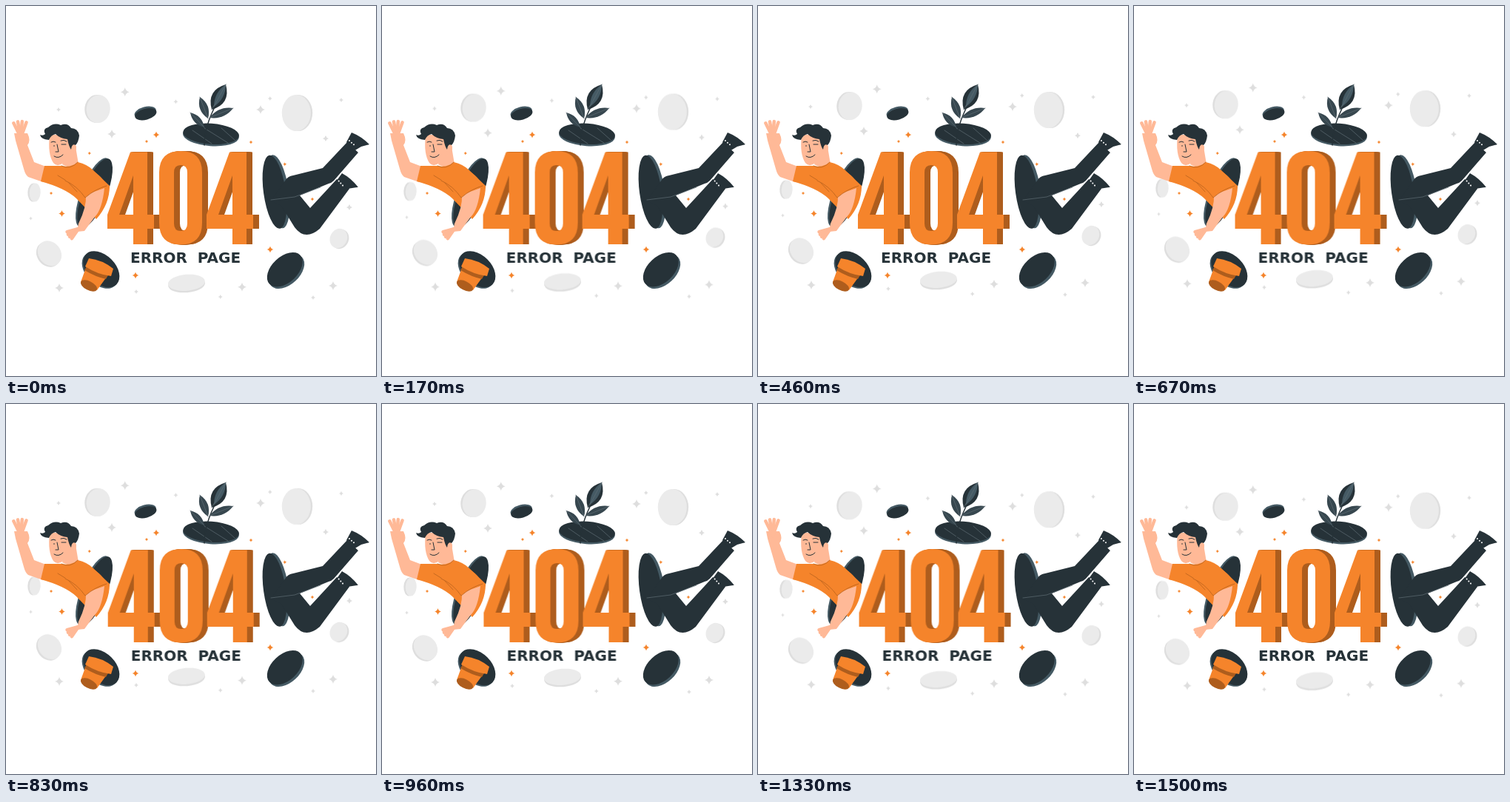
These frames come from a looping animation (500 by 500 pixels, 1540 ms). An HTML page:

```html
<!DOCTYPE html>
<html lang="en">
<head>
<meta charset="utf-8">
<title>404 error page</title>
<style>
  html, body { margin: 0; width: 100%; height: 100%; overflow: hidden; background: #fff; }
  svg { display: block; width: 100%; height: 100%; }
  .ink { fill: #263238; }
  .skin { fill: #ffb997; }
  .org { fill: #f5842b; }
  .rust { fill: #ae5d1d; }
  .line, .fold, .vein, .finger { fill: none; stroke-linecap: round; stroke-linejoin: round; }
  .line { stroke: #263238; }
  .fold { stroke: #b9621e; stroke-width: .8; }
  .vein { stroke: #5f6d74; stroke-width: .7; }
  .finger { stroke: #ffb997; stroke-width: 4.5; }
  .laces { fill: none; stroke: #fff; stroke-width: 2; stroke-linecap: round; stroke-dasharray: 0 4; }
  text { font: 700 20px "DejaVu Sans", sans-serif; white-space: pre; }
  #float { animation: float 1540ms linear infinite; }
  #title { animation: shake 1540ms ease infinite; }
  @keyframes float { 50% { transform: translateY(-6.67px); } }
  @keyframes shake {
    10%, 90% { transform: translateX(-.6px); }
    20%, 80% { transform: translateX(1.2px); }
    30%, 50%, 70% { transform: translateX(-2px); }
    40%, 60% { transform: translateX(2px); }
  }
</style>
</head>
<body>
<svg viewBox="0 0 500 500">
  <defs>
    <path id="four" fill-rule="evenodd" d="M168 197.500H191V282H200V301H191V322H172V301H137V282ZM172 229L153 282H172Z"/>
    <path id="zero" fill-rule="evenodd" d="M236 196Q265 196 265 225V293Q265 322.500 236 322.500T207 293V225Q207 196 236 196ZM236 215Q227 215 227 225V294Q227 304 236 304T245 294V225Q245 215 236 215Z"/>
  </defs>

  <g id="float"></g>
  <g id="sparks"></g>
  <g id="holes"></g>

  <g id="plant">
    <path class="vein" d="M252 168L278 186M268 165L300 185M291 165L309 181"/>
    <path class="line" stroke-width="1.500" d="M268 188C268 170 273 153 285 131"/>
  </g>

  <!-- pot -->
  <path class="org" d="M109 351L139 362L123 384L101 373Z"/>
  <path class="rust" d="M109 352L139 362L135 369Q121 366 106 357Z"/>
  <ellipse class="rust" cx="112" cy="378" rx="12" ry="6" transform="rotate(27 112 378)"/>
  <path class="org" d="M112 341Q130 343 145 355L142 365Q124 363 107 352Z"/>

  <!-- waving man -->
  <g id="man">
    <path class="skin" d="M11 172L29 172Q34 182 29 188L38 211L54 217L50 238L30 231Q26 228 24 220L13 182Z"/>
    <path class="skin" d="M80 195L94 190L98 214Q88 221 76 214Z"/>
    <path class="org" d="M52 216L75 216Q87 219 97 211Q110 214 118 222L140 243Q140 268 122 288L95 260Q80 246 47 237Z"/>
    <path class="fold" d="M75 216Q87 222 97 211M70 229L83 237L96 251"/>
    <path class="skin" d="M59 174Q56 200 64 212Q72 222 86 202Q96 199 95 190L87 174Z"/>
    <path class="ink" d="M58 181Q47 180 46 174Q50 176 53 173Q49 166 57 164Q65 157 74 161Q83 157 88 165Q97 165 99 175Q98 184 94 188Q89 185 88 194Q85 190 83 180Q73 179 67 173Q61 174 58 181Z"/>
    <path class="line" d="M61 184Q64 182 67 184M74 182Q78 180 82 183M75 187H81M69 187L71 197H67M65 203Q71 207 77 201M65 188.500V189.500"/>
    <path class="skin" d="M108 255Q109 272 98 294L96 305L106 304L120 285Q130 275 133 246Z"/>
    <path class="org" d="M80 236Q92 219 110 220Q128 226 136 243Q121 247 107 259Q96 243 80 236Z"/>
    <path class="fold" d="M80 236Q96 243 107 259Q121 247 136 243"/>
  </g>

  <!-- legs -->
  <path class="ink" d="M358 263L378 235Q381 230 388 229L428 219L461 184L476 198L443 236Q440 239 436 240L397 256L411 273L447 234L464 247L424 301Q404 318 390 299L372 270Z"/>
  <path class="vein" d="M358 262L390 258L425 245"/>
  <g id="shoe">
    <path class="ink" d="M467 171Q480 176 491 187L480 190L470 196L460 184Z"/>
    <path class="line" stroke="#fff" d="M468 173L489 187"/>
    <path class="laces" d="M464 182L472 189"/>
  </g>
  <use href="#shoe" transform="translate(15 -1) rotate(7 455 228) translate(-28 58)"/>

  <g id="title">
    <text class="ink" x="168" y="347">ERROR  PAGE</text>
  </g>
</svg>
<script>
  const NS = 'http://www.w3.org/2000/svg';
  const { float, sparks, holes, plant, man, title } = Object.fromEntries(
    [...document.querySelectorAll('g[id]')].map(g => [g.id, g]));
  const PALE = '#dedede', ORANGE = '#f5842b', INK = '#263238', SLATE = '#455a64';

  function add(parent, tag, attrs) {
    const el = document.createElementNS(NS, tag);
    for (const k in attrs) el.setAttribute(k, attrs[k]);
    parent.append(el);
  }

  // Four-pointed star with hollow sides.
  function star(parent, fill, r, x, y) {
    let d = `M${x + r} ${y}`;
    for (let a = 0; a < 4; a++) {
      const mid = (a + .5) * Math.PI / 2, tip = (a + 1) * Math.PI / 2;
      d += `Q${x + r * .28 * Math.cos(mid)} ${y + r * .28 * Math.sin(mid)} ` +
        `${x + r * Math.cos(tip)} ${y + r * Math.sin(tip)}`;
    }
    add(parent, 'path', { d, fill });
  }

  // n stars spread evenly along a quadratic curve from a to b.
  function trail(parent, fill, r, n, a, c, b) {
    for (let i = 0; i < n; i++) {
      const t = i / (n - 1), u = 1 - t;
      star(parent, fill, r, ...a.map((p, k) => u * u * p + 2 * u * t * c[k] + t * t * b[k]));
    }
  }

  // Tilted disc; its face slides along the short axis towards the stage centre.
  function coin(parent, edge, face, x, y, rx, ry, turn, depth = 1.2) {
    const a = turn * Math.PI / 180 + (rx > ry ? Math.PI / 2 : 0);
    const ux = Math.cos(a), uy = Math.sin(a);
    const s = depth * Math.sign((250 - x) * ux + (250 - y) * uy);
    for (const [fill, k] of [[edge, -s], [face, s]]) {
      const cx = x + k * ux, cy = y + k * uy;
      add(parent, 'ellipse', { cx, cy, rx, ry, fill, transform: `rotate(${turn} ${cx} ${cy})` });
    }
  }
  const pale = (...shape) => coin(float, PALE, '#ebebeb', ...shape);
  const hole = (...shape) => coin(holes, SLATE, INK, ...shape);

  function leaf(fill, x0, y0, x1, y1, w) {
    const len = Math.hypot(x1 - x0, y1 - y0);
    const nx = (y0 - y1) / len * w, ny = (x1 - x0) / len * w;
    const mx = (x0 + x1) / 2, my = (y0 + y1) / 2;
    add(plant, 'path', {
      fill, d: `M${x0} ${y0}Q${mx + nx} ${my + ny} ${x1} ${y1}Q${mx - nx} ${my - ny} ${x0} ${y0}`
    });
    add(plant, 'path', { class: 'vein', d: `M${x0} ${y0}L${x1} ${y1}` });
  }

  function fingers(x, y, len, from, to) {
    for (let i = 0; i < 4; i++) {
      const a = (from + (to - from) * i / 3) * Math.PI / 180;
      add(man, 'path', { class: 'finger', d: `M${x} ${y}l${len * Math.cos(a)} ${len * Math.sin(a)}` });
    }
  }

  // Solid digit: dark copies pushed sideways under the front.
  function digit(name, x) {
    for (let depth = 8; depth >= 0; depth--) {
      add(title, 'use', { href: '#' + name, x: x + depth, class: depth ? 'rust' : 'org' });
    }
  }

  pale(123.5, 139, 16, 19, 8);
  pale(393.5, 144.500, 19.500, 24.500, 0);
  pale(38, 252, 7.500, 12.500, 3);
  pale(58, 335, 15, 18, -38);
  pale(450.5, 314.500, 11.500, 13.500, 25);
  pale(244, 375, 25, 11, -5);

  hole(188.5, 145, 15, 7.500, -15);
  hole(277, 174, 38, 14, 4, -1.2);
  hole(128, 356.5, 29, 19, 45);
  hole(378, 357.5, 28.500, 17.500, -43, 1.8);
  hole(119, 252.5, 16, 50, 22);
  hole(365, 251, 15, 50, -8, 2);

  trail(float, PALE, 3, 4, [71, 140], [332, 119], [453, 127]);
  trail(float, PALE, 3, 3, [176, 386], [284, 396], [415, 394]);
  trail(float, PALE, 6, 3, [72, 381], [381, 380], [442, 378]);
  trail(float, PALE, 6, 3, [143, 173], [78, 76], [344, 140]);
  trail(float, PALE, 4, 2, [432, 179], [448, 225], [464, 272]);
  star(float, PALE, 2.5, 33.5, 287);

  trail(sparks, ORANGE, 2.5, 3, [331, 184], [381, 205], [414, 261]);
  trail(sparks, ORANGE, 2.3, 3, [190, 183], [100, 180], [61, 253]);
  trail(sparks, ORANGE, 4.5, 2, [203, 174], [139, 227], [75.5, 280.5]);
  trail(sparks, ORANGE, 4.5, 2, [175, 364], [266, 346], [357, 329]);

  leaf(INK, 278, 140, 297, 106, 19);
  leaf(SLATE, 281, 136, 297, 106, 9);
  leaf('#37474f', 275, 151, 307, 138, 10);
  leaf('#37474f', 273, 152, 262, 123, 11);
  leaf('#37474f', 268, 164, 249, 144, 9);

  fingers(20, 178, 22, -116, -70);
  fingers(98, 301, 16, 165, 125);

  digit('four', 0);
  digit('zero', 0);
  digit('four', 134);
</script>
</body>
</html>
```
